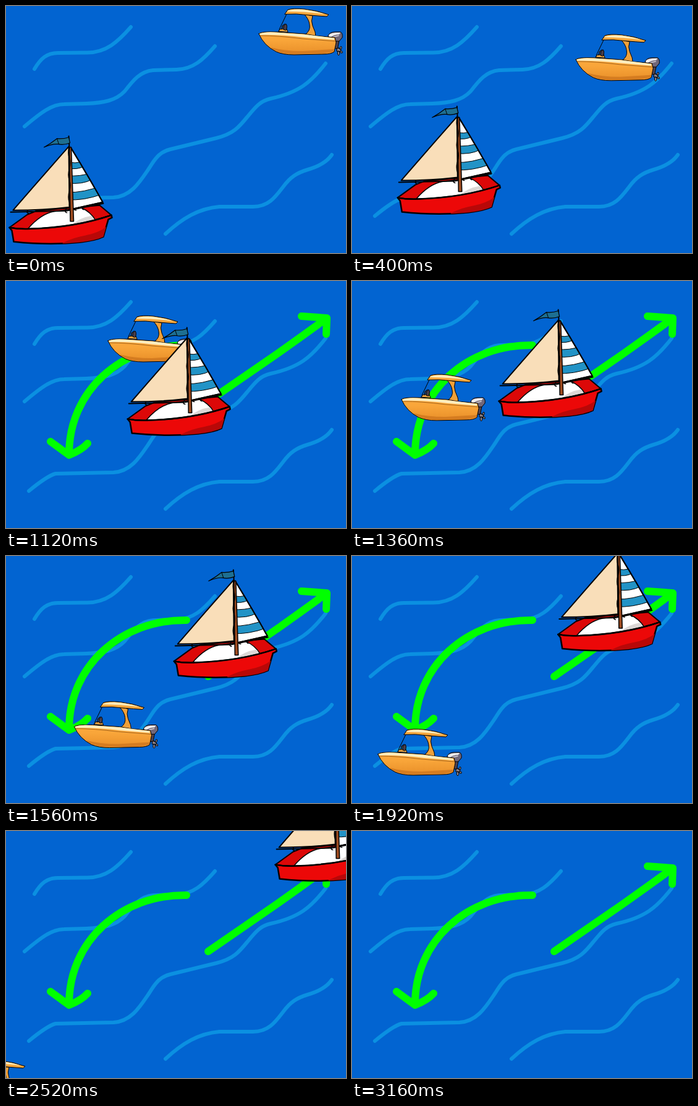
An HTML page that plays this animation: 550 px wide and 400 px high, repeating every 3.2 s.

```html
<!DOCTYPE html>
<html lang="en">
<head>
<meta charset="utf-8">
<title>Two boats passing</title>
<style>
  html, body { margin: 0; width: 100%; height: 100%; overflow: hidden; background: #0264d1; }
  svg { display: block; width: 550px; height: 400px; }
  .waves { fill: none; stroke: #0b90e1; stroke-width: 6; stroke-linecap: round; }
  .arrows { fill: none; stroke: #0f0; stroke-width: 12; stroke-linecap: round; stroke-linejoin: round; }
  .boat { stroke: #000; stroke-linejoin: round; stroke-linecap: round; }
  .flat { stroke: none; }
  .line { fill: none; }
</style>
</head>
<body>
<svg viewBox="0 0 550 400">
  <defs>
    <clipPath id="jib"><path d="M105 228Q133 274 157 317L108 328Z"/></clipPath>
    <clipPath id="hull"><path d="M6 358Q22 361 40 360Q112 358 171 338L166 345L158 373Q146 379 120 382Q70 387 13 381L10 363Z"/></clipPath>
    <linearGradient id="orange" x2="0" y2="1">
      <stop offset=".35" stop-color="#f9a63a"/>
      <stop offset="1" stop-color="#e88e28"/>
    </linearGradient>
  </defs>
  <rect width="550" height="400" fill="#0264d1"/>

  <g class="waves">
    <path d="M46 102C56 85 66 76 84 76L132 75.500C162 75 180 59 202 34"/>
    <path d="M30 195C56 173 74 159 94 159L130 158C158 157 178 153 192 138C206 120 217 106 238 104L276 103C303 102 319 87 338 65"/>
    <path d="M37 340Q66 316 80 312L174 310C203 308 217 284 232 262C243 244 250 236 266 232L340 214C368 207 377 196 390 180C404 163 411 154 428 150C474 140 493 124 517 93"/>
    <path d="M258 369C286 343 312 328 345 325L400 325C425 325 436 309 449 292C460 277 471 270 488 265Q516 257 527 241"/>
  </g>

  <g id="arrows" class="arrows">
    <path d="M292 104C187 102 101 178 102 282M72 260L102 282Q122 274 132 263"/>
    <path d="M327 195L440 117L475 92L518 61M478 57L519 60L518 86"/>
  </g>

  <g id="motor" class="boat" stroke-width="1">
    <!-- outboard engine -->
    <path d="M529 56L539 56L537 66L539 70L533 69Z" fill="#50434f"/>
    <path d="M536 68L542 70L541 74L535 73ZM540 70Q540 64 543 66Q544 69 541 71M541 73Q545 72 544 76Q541 77 540 74M537 73Q535 78 538 80Q541 78 539 73" fill="#8a8088"/>
    <path d="M521 48Q524 42 532 42L541 42Q545 44 544 51L539 57L526 57Z" fill="#71677a"/>
    <path class="flat" d="M522 47Q526 42.500 541 43L539 46Q530 46 523 52Z" fill="#f0eeee"/>
    <path class="line" d="M530 50L538 48" stroke="#d6d0d4" stroke-width="1.500"/>
    <!-- cabin -->
    <path class="line" d="M454 13L442 38M441 40L449 39"/>
    <path d="M441 41L444 37L454 37L456 42Z" fill="#e6a040"/>
    <path d="M446 38L447 32L451 29M449 38Q448 31 453 29Q456 33 453 39Z" fill="#4b3e48"/>
    <path d="M482 13L496 16Q493 24 496 32L500 42L501 49L484 46Q493 40 491 30Q490 21 482 13Z" fill="#f0a038"/>
    <path d="M451 13L456 6Q464 3 483 5Q502 7 522 14L519 17Q490 15 470 13Z" fill="#f5a63c"/>
    <path class="flat" d="M455 8Q466 4 484 6Q504 9 515 13Q484 9 455 9Z" fill="#ffebb9"/>
    <!-- hull -->
    <path d="M409 45Q411 41 438 42L482 45L500 48L532 51L534 59L531 74Q526 78 514 78L466 79Q448 79 437 74Q417 64 409 45Z" fill="url(#orange)"/>
    <path class="flat" d="M410 45Q420 41 440 43L484 46L531 52V55L484 51Q440 46 411 47Z" fill="#ffedbe"/>
    <path class="line" d="M412 48Q440 48 480 53L532 57" stroke="#8e5316" stroke-width=".8"/>
    <path class="flat" d="M428 67Q450 73 480 73L531 70L530 74L514 77L466 78Q442 78 428 67Z" fill="#d57c20"/>
  </g>

  <g id="sail" class="boat" stroke-width="2">
    <!-- cockpit -->
    <path d="M6 358L35 337L50 331L152 322L171 338Q112 358 40 360Q22 361 6 358Z" fill="#dc0808"/>
    <path d="M36 360C48 346 62 335 78 332L122 326Q137 332 146 347Q100 358 36 360Z" fill="#fff" stroke-width="1.500"/>
    <path class="flat" d="M108 353Q120 342 139 339L145 347Q128 351 108 353Z" fill="#dcd8d6"/>
    <!-- hull -->
    <path d="M6 358Q22 361 40 360Q112 358 171 338L172 342L166 345L158 373Q146 379 120 382Q70 387 13 381L10 363Z" fill="#ec0808" stroke-width="2.500"/>
    <path class="flat" clip-path="url(#hull)" d="M92 383Q110 374 128 371Q150 367 164 356L160 390L92 390Z" fill="#b80808"/>
    <path class="line" d="M6 358Q22 361 40 360Q112 358 171 338" stroke-width="2"/>
    <!-- boom -->
    <path class="line" d="M8 333L98 331L158 319"/>
    <path class="line" d="M36 330q-4 4 1 5M98 328q-4 5 1 6M112 325q-3 5 2 5M125 324q-3 4 1 5" stroke-width="1.500"/>
    <!-- sails -->
    <path d="M102 227Q56 279 12 330Q62 330 103 325Z" fill="#f9deb9"/>
    <path d="M105 228Q133 274 157 317L108 328Z" fill="#fff"/>
    <g clip-path="url(#jib)" fill="#2293c6" stroke-width="1">
      <path d="M100 251Q112 256 126 250V259Q116 265 100 262Z"/>
      <path d="M100 274Q120 276 140 269V280Q124 289 100 286Z"/>
      <path d="M100 301Q126 302 156 290V304Q126 315 100 313Z"/>
    </g>
    <path class="line" d="M105 228Q133 274 157 317L108 328"/>
    <!-- mast and flag -->
    <path d="M103 228L106 228L110 348L104.500 348Z" fill="#a04c20" stroke-width="1.500"/>
    <path class="line" d="M103 228q-3 9 0 17t0 18t0 18t0 18t0 18" stroke-width="1.500"/>
    <path class="line" d="M102 210L103 230"/>
    <path d="M62 228Q73 222 83 214Q92 215 102 212L104 221Q94 225 85 223Q76 222 62 228Z" fill="#1d6f92" stroke-width="1.200"/>
    <path class="line" d="M83 214L86 223" stroke-width="1"/>
  </g>
</svg>
<script>
  const LOOP = 3200, STEP = 40, ARROWS_AT = 920;
  const $ = id => document.getElementById(id);
  const [sail, motor, arrows] = ['sail', 'motor', 'arrows'].map($);

  // Bow of the motorboat: start time, then two points (straight) or four (cubic).
  const BOW = [409, 45];
  const route = [
    [0, BOW, [320, 124.5]],
    [760, [320, 124.5], [270, 106], [208, 87], [165, 97]],
    [1120, [165, 97], [72, 126], [55, 235], [110.5, 276.5]],
    [1560, [110.5, 276.5], [93, 286]],
    [1680, [93, 286], [42, 321]],
    [1920, [42, 321], [-214.5, 509]]
  ];

  const mix = (a, b, k) => a.map((v, i) => v + (b[i] - v) * k);

  function along(points, k) {
    while (points.length > 1) {
      points = points.slice(1).map((p, i) => mix(points[i], p, k));
    }
    return points[0];
  }

  function bowAt(t) {
    const i = route.findLastIndex(leg => leg[0] <= t);
    const [start, ...points] = route[i];
    const end = i + 1 < route.length ? route[i + 1][0] : LOOP - STEP;
    return along(points, (t - start) / (end - start));
  }

  const place = (el, x, y) => el.setAttribute('transform', `translate(${x.toFixed(2)} ${y.toFixed(2)})`);

  function draw(now) {
    const t = Math.floor((now % LOOP) / STEP) * STEP;
    const [x, y] = bowAt(t);
    place(sail, t * 0.1707 - 0.5, 0.7 - t * 0.1207);
    place(motor, x - BOW[0], y - BOW[1]);
    arrows.style.display = t >= ARROWS_AT ? '' : 'none';
  }

  const begin = performance.now();
  function tick() {
    draw(performance.now() - begin);
    requestAnimationFrame(tick);
  }
  tick();
</script>
</body>
</html>
```
